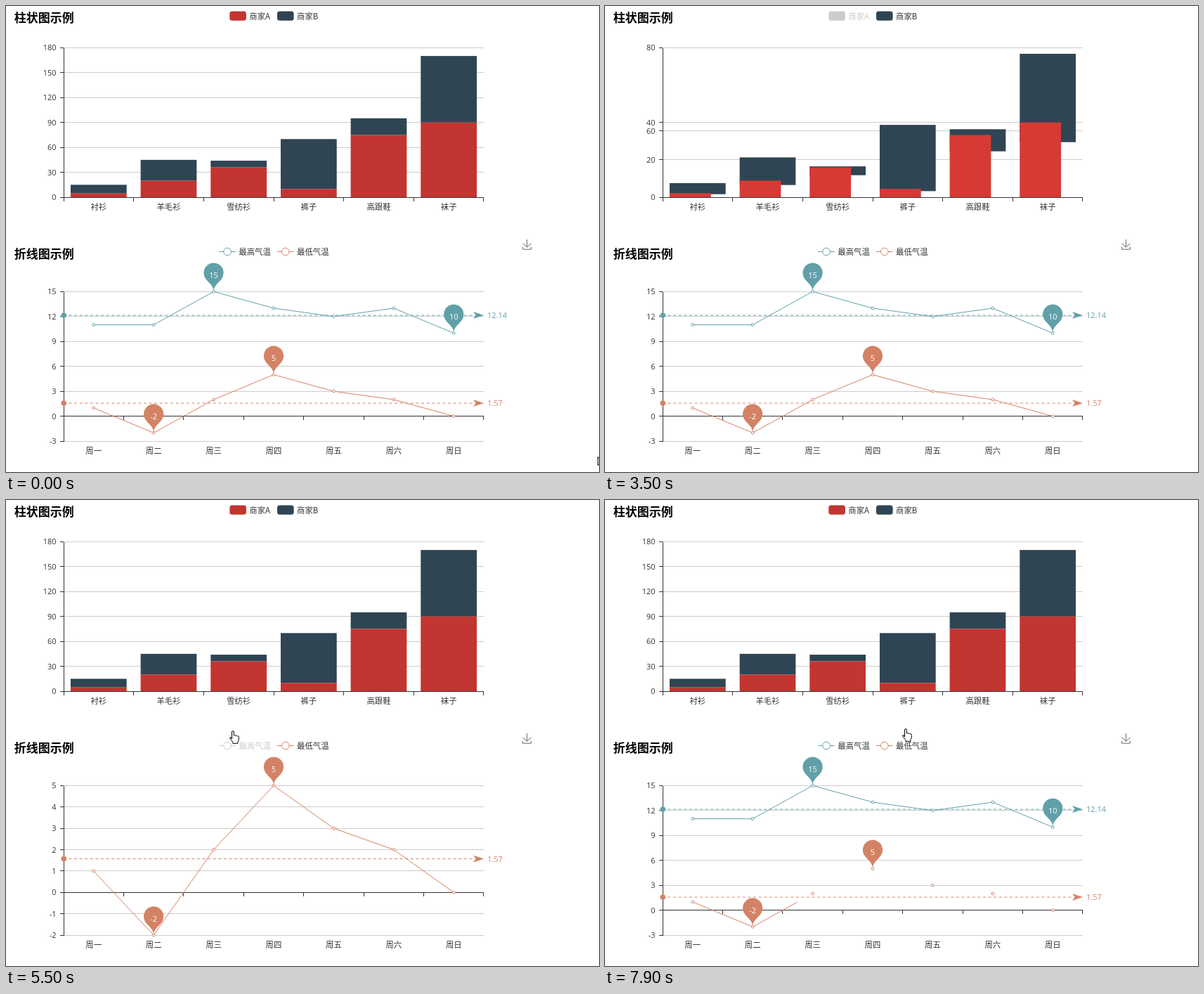
These frames come from a looping animation (844 px wide and 663 px high, 8 s). An HTML page:

```html
<!DOCTYPE html>
<html lang="zh">
<head>
<meta charset="utf-8">
<title>图表示例</title>
<style>
html, body { margin: 0; width: 100%; height: 100%; overflow: hidden; background: #fff; }
svg { display: block; width: 844px; height: 663px; }
text { font: 11.4px "Noto Sans CJK SC", "Noto Sans CJK", sans-serif; fill: #333; }
.num { font: 11px "Open Sans", "Noto Sans", sans-serif; }
.title { font-size: 17px; font-weight: 700; fill: #000; }
.rule { shape-rendering: crispEdges; }
</style>
</head>
<body>
<svg id="stage" viewBox="0 0 844 663"></svg>
<script>
const LOOP = 8000, STEP = 100, UPDATE = 300, REVEAL = 1000;
const LEFT = 82, RIGHT = 680, PLOT_H = 212.8;
const GREY = '#ccc', INK = '#333';

const bars = {
  title: '柱状图示例', titleY: 23, top: 59.3, labelY: 290,
  cats: ['衬衫', '羊毛衫', '雪纺衫', '裤子', '高跟鞋', '袜子'],
  series: [
    { name: '商家A', color: '#c23531', hot: '#d53a35', data: [5, 20, 36, 10, 75, 90], hover: [2950, 3471] },
    { name: '商家B', color: '#2f4554', hot: '#344c5c', data: [10, 25, 8, 60, 20, 80], hover: [1390, 1880] }
  ],
  phases: [
    { at: -REVEAL, min: 0, max: 180, step: 30, on: [1, 1] },
    { at: 1880, min: 0, max: 100, step: 20, on: [1, 0] },
    { at: 2680, min: 0, max: 180, step: 30, on: [1, 1] },
    { at: 3471, min: 0, max: 80, step: 20, on: [0, 1] },
    { at: 4149, min: 0, max: 180, step: 30, on: [1, 1] }
  ]
};

const lines = {
  title: '折线图示例', titleY: 359, top: 406.3, labelY: 637,
  cats: [...'一二三四五六日'].map(d => '周' + d),
  series: [
    { name: '最高气温', color: '#61a0a8', data: [11, 11, 15, 13, 12, 13, 10], pins: [2, 6], hover: [5090, 5180] },
    { name: '最低气温', color: '#d48265', data: [1, -2, 2, 5, 3, 2, 0], pins: [3, 1], hover: [6660, 6790] }
  ],
  phases: [
    { at: -REVEAL, min: -3, max: 15, step: 3, on: [1, 1] },
    { at: 5180, min: -2, max: 5, step: 1, on: [0, 1] },
    { at: 6080, min: -3, max: 15, step: 3, on: [1, 1] },
    { at: 6790, min: 0, max: 15, step: 3, on: [1, 0] },
    { at: 7580, min: -3, max: 15, step: 3, on: [1, 1] }
  ]
};

// time, x, y, shape
const pointer = [
  [0, 842, 641, 'arrow'], [200, 842, 641, 'arrow'], [1100, 425, 35, 'arrow'],
  [1200, 425, 2, 'arrow'], [1300, 425, -30, 'arrow'], [4400, 350, -30, 'arrow'],
  [4700, 345, 450, 'arrow'], [4800, 338, 456, 'arrow'], [5000, 323, 328.5, 'hand'],
  [6400, 323, 328.5, 'hand'], [6700, 428, 325.5, 'hand'], [LOOP, 428, 325.5, 'hand']
];
const shapes = {
  arrow: 'M.5 .5V12.5L3 9.9L5 13.8L6.8 13L4.9 9.2H8.8Z',
  hand: 'M-1.5 11.5V1.5a1.4 1.4 0 0 1 2.8 0V6.5q1.5-1 2.6 .4q1.5-.8 2.5 .5q1.9-.6 1.9 1.4v3.7l-1.4 3.3v2h-7v-1.8l-4.2-5.3q-.6-1.9 1.2-1.6z'
};

const clamp = v => Math.min(1, Math.max(0, v));
const mix = (a, b, k) => a + (b - a) * k;
const easeOut = p => 1 - (1 - p) ** 3;
const crisp = v => Math.floor(v) + .5;
const within = (t, [a, b]) => t >= a && t < b;

const rect = (x, y, w, h, fill, r = 0) =>
  `<rect x="${x}" y="${y}" width="${w}" height="${h}" rx="${r}" fill="${fill}"/>`;
const rule = (x1, y1, x2, y2, color) =>
  `<path class="rule" d="M${x1} ${y1}L${x2} ${y2}" stroke="${color}"/>`;
const circle = (x, y, r, fill, stroke = 'none') =>
  `<circle cx="${x}" cy="${y}" r="${r}" fill="${fill}" stroke="${stroke}"/>`;
const text = (s, x, y, { cls = '', anchor = 'start', fill = '' } = {}) =>
  `<text x="${x}" y="${y}" class="${cls}" text-anchor="${anchor}"${fill && ` style="fill:${fill}"`}>${s}</text>`;

// Current phase, the one before it, and the eased progress between them
function view(chart, t) {
  const i = chart.phases.findLastIndex(p => p.at <= t);
  const cur = chart.phases[i], prev = chart.phases[i - 1] || cur;
  const k = easeOut(clamp((t - cur.at) / UPDATE));
  const place = (p, v) => chart.top + PLOT_H * (p.max - v) / (p.max - p.min);
  return {
    cur, prev, k, place,
    move: (v, old = v) => mix(place(prev, old), place(cur, v), k),
    had: v => v >= prev.min && v <= prev.max && v % prev.step === 0
  };
}

function frame(chart, v) {
  const { cur, place, move, had } = v, n = chart.cats.length;
  const zero = crisp(move(0)), gap = (RIGHT - LEFT) / n;
  let grid = '', out = '';
  for (let val = cur.min; val <= cur.max; val += cur.step) {
    const y = had(val) ? move(val) : place(cur, val), cy = crisp(y);
    grid += rule(LEFT, cy, RIGHT, cy, GREY);
    out += rule(LEFT - 5, cy, LEFT, cy, INK) + text(val, 71.5, y + 4, { cls: 'num', anchor: 'end' });
  }
  out += rule(LEFT + .5, crisp(chart.top), LEFT + .5, crisp(chart.top + PLOT_H), INK);
  out += rule(LEFT, zero, RIGHT, zero, INK);
  for (let i = 0; i <= n; i++) {
    const x = crisp(LEFT + gap * i - (i === n ? 1 : 0));
    out += rule(x, zero, x, zero + 5, INK);
    if (i < n) out += text(chart.cats[i], LEFT + gap * (i + .5), chart.labelY, { anchor: 'middle' });
  }
  return grid + out + text(chart.title, 11.7, chart.titleY, { cls: 'title' });
}

function drawBars(t) {
  const v = view(bars, t), { cur, prev, k, place, move } = v;
  const gap = (RIGHT - LEFT) / bars.cats.length, full = gap * .8;
  let still = '', changing = '', labels = '', legend = '';

  bars.series.forEach((s, n) => {
    const on = cur.on[n], was = prev.on[n], hot = within(t, s.hover);
    const base = (p, i) => n && p.on[0] ? bars.series[0].data[i] : 0;
    s.data.forEach((d, i) => {
      const x = LEFT + gap * (i + .1), b = base(cur, i), pb = base(prev, i);
      if (on && was) {
        const y = move(b + d, pb + d);
        still += rect(x, y, full, move(b, pb) - y, hot ? s.hot : s.color);
        if (hot) labels += text(d, x + full / 2, y - 5.5, { cls: 'num', anchor: 'middle', fill: s.color });
      } else if (on || was && k < 1) {
        const p = on ? cur : prev, from = on ? b : pb, y = place(p, from + d);
        changing += rect(x, y, full * (on ? k : 1 - k), place(p, from) - y, on ? s.color : s.hot);
      }
    });
    const lx = n ? 386 : 318.3;
    legend += rect(lx, 7.6, 23.6, 13.1, on ? s.color : GREY, 3.5)
      + text(s.name, lx + 28, 18.6, { fill: on ? INK : GREY });
  });
  return frame(bars, v) + still + changing + labels + legend;
}

function pin(x, y, label, color) {
  const h = 47, r = 14.15, dy = r * r / (h - r), cy = y - h + r + dy;
  const sin = dy / r, cos = Math.sqrt(1 - sin * sin), dx = cos * r;
  const cx = dx - sin * r * .6, c2 = cy + dy + cos * r * .6, tip = y - r * .7;
  return `<path fill="${color}" d="M${x - dx} ${cy + dy}A${r} ${r} 0 1 1 ${x + dx} ${cy + dy}`
    + `C${x + cx} ${c2} ${x} ${tip} ${x} ${y}C${x} ${tip} ${x - cx} ${c2} ${x - dx} ${cy + dy}Z"/>`
    + text(label, x, y - 19.6, { cls: 'num', anchor: 'middle', fill: '#fff' });
}

function average(y, value, color) {
  return circle(LEFT + .3, y, 3.8, color)
    + `<path d="M${LEFT} ${y}H668" stroke="${color}" stroke-dasharray="3.8"/>`
    + `<path d="M${RIGHT} ${y}l-15 5l3.8-5l-3.8-5z" fill="${color}"/>`
    + text(value.toFixed(2), 685, y + 4, { cls: 'num', fill: color });
}

function drawLines(t) {
  const v = view(lines, t), { cur, prev, k, place, move } = v;
  const gap = (RIGHT - LEFT) / lines.cats.length;
  let curves = '', dots = '', marks = '', pins = '', legend = '';

  lines.series.forEach((s, n) => {
    const on = cur.on[n], was = prev.on[n];
    const yOf = d => on && was ? move(d) : place(on ? cur : prev, d);
    const pts = s.data.map((d, i) => [LEFT + gap * (i + .5), yOf(d)]);
    const size = on ? (was ? (within(t, s.hover) ? 1.75 : 1) : k) : 1.75 * (1 - k);
    if (on || was && k < 1)
      dots += pts.map(([x, y]) => circle(x, y, 1.9 * size, '#fff', s.color)).join('');
    if (on) {
      const shown = was ? 1 : clamp((t - cur.at) / REVEAL);
      const mean = s.data.reduce((a, b) => a + b) / s.data.length;
      curves += `<clipPath id="clip${n}"><rect x="${LEFT}" y="380" width="${(RIGHT - LEFT) * shown}" height="260"/></clipPath>`
        + `<polyline clip-path="url(#clip${n})" points="${pts.join(' ')}" fill="none" stroke="${s.color}"/>`;
      marks += average(yOf(mean), mean, s.color);
      pins += s.pins.map(i => pin(...pts[i], s.data[i], s.color)).join('');
    }
    const lx = n ? 386 : 303.3, tone = on ? s.color : GREY;
    legend += `<path d="M${lx} 349.5h23.6" stroke="${tone}"/>` + circle(lx + 11.8, 349.5, 5.3, '#fff', tone)
      + text(s.name, lx + 28, 353.7, { fill: on ? INK : GREY });
  });
  return frame(lines, v) + curves + dots + marks + pins + legend;
}

function drawPointer(t) {
  const i = pointer.findLastIndex(p => p[0] <= t);
  const a = pointer[i], b = pointer[i + 1] || a;
  const p = b === a ? 0 : (t - a[0]) / (b[0] - a[0]), k = p * p * (3 - 2 * p);
  return `<path transform="translate(${mix(a[1], b[1], k)} ${mix(a[2], b[2], k)})" d="${shapes[a[3]]}" fill="#fff" stroke="#000"/>`;
}

const saveIcon = '<path transform="translate(734.4 332.2) scale(.241)" fill="none" stroke="#666" stroke-width="4.1" '
  + 'd="M4.7 22.9L29.3 45.5L54.7 23.4M4.6 43.6V58H53.8V43.6M29.2 45.1V0"/>';

const stage = document.getElementById('stage');
const start = performance.now();
let last = -1;

function tick(now) {
  // The picture advances in even steps of a tenth of a second
  const t = Math.floor(Math.max(0, now - start) % LOOP / STEP) * STEP;
  if (t !== last) {
    stage.innerHTML = drawBars(t) + drawLines(t) + saveIcon + drawPointer(t);
    last = t;
  }
  requestAnimationFrame(tick);
}
tick(start);
</script>
</body>
</html>
```
